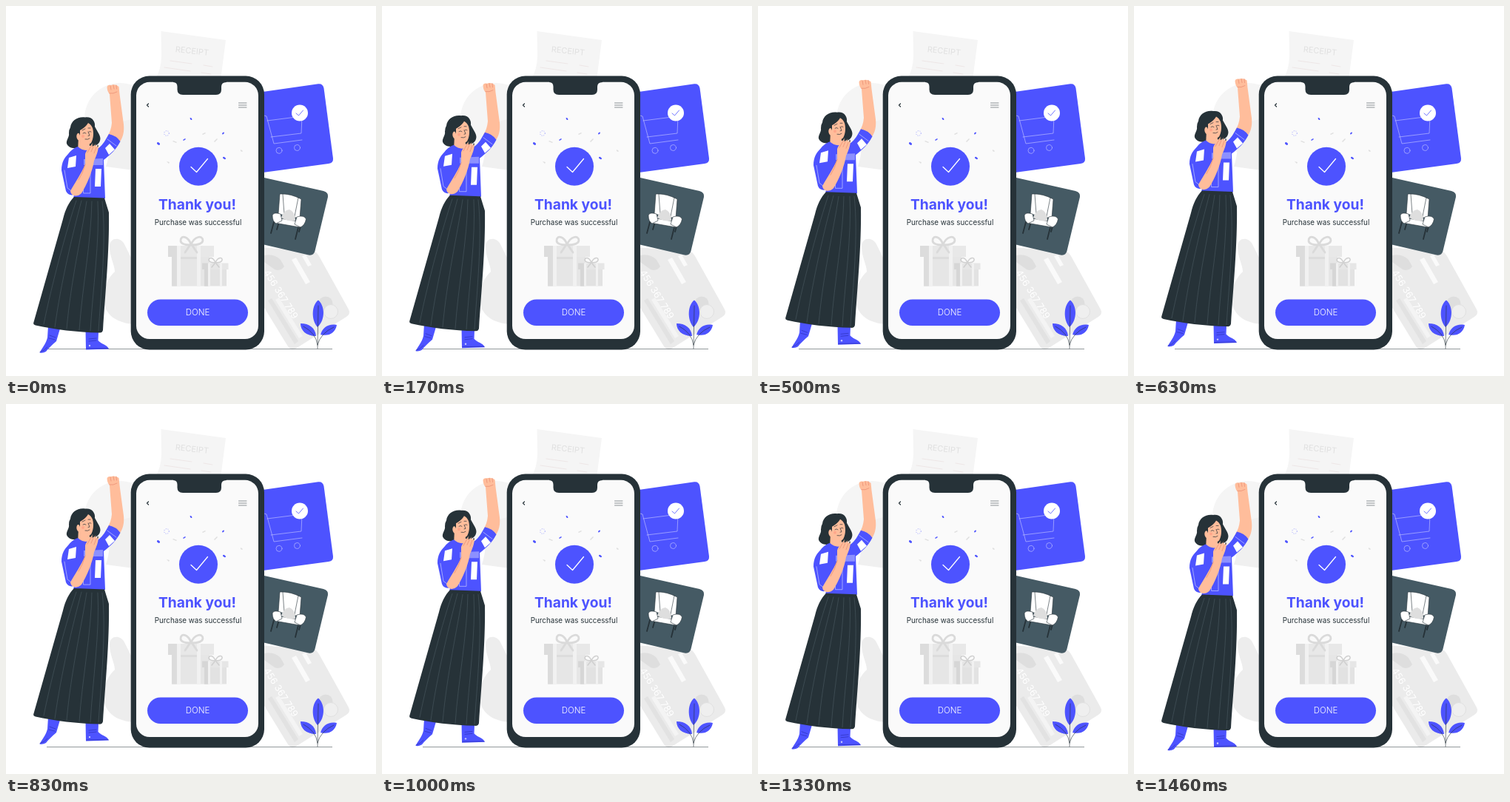
An HTML page that plays this animation: 500x500 px, repeating every 1.5 s.

```html
<!DOCTYPE html>
<html lang="en">
<head>
<meta charset="utf-8">
<style>
html, body { margin: 0; width: 100%; height: 100%; overflow: hidden; background: #fff; }
svg { display: block; width: 100vw; height: 100vh; }
text { font-family: Inter, Lato, sans-serif; text-anchor: middle; }
.blue { fill: #4d53ff; }
.dark { fill: #263238; }
.skin { fill: #ffbd9b; }
.white { fill: #fff; }
.line { fill: none; stroke-linecap: round; stroke-linejoin: round; }
</style>
</head>
<body>
<svg viewBox="0 0 500 500">
  <g id="backdrop">
    <circle cx="154" cy="152" r="48" fill="#f5f5f5"/>
    <path d="M143 160L180 150V223L135 217C140 203 141 182 143 160Z" fill="#f0f0f0"/>
    <path d="M209.500 34L297 46L290 100H201C207 90 210 80 210 65Z" fill="#f5f5f5"/>
    <text transform="translate(251 64.500) rotate(6)" font-size="11" fill="#e0e0e0">RECEIPT</text>
    <path class="line" d="M222 74l29 4m16 2l12 2M214 83l35 5m15 2l13 2" stroke="#ebe2e2" stroke-width=".8"/>
  </g>
  <path d="M175 352L160 322C155 312 140 312 140 325C140 339 147 350 147 359C138 367 132 380 132 396C133 418 150 429 175 430Z" fill="#ededed"/>

  <g id="bank-card">
    <path d="M340 326L416 331Q420 333 423 338L463 410Q466 416 460 420L393 462Q386 467 381 460L340 393Z" fill="#ebebeb"/>
    <path d="M386 343l6-3 19 33-6 3ZM400 338l5-2 8 14-5 2Z" fill="#fafafa"/>
    <path d="M364 397l5-3 32 52-5 3Z" fill="#f4f4f4"/>
    <path d="M354 398l5-3 36 58-5 4Z" fill="#e2e2e2"/>
    <path d="M349 337q13-3 22 6l5 9q-5 7-13 4l-14-10Z" fill="#dedede"/>
    <text transform="translate(368 392) rotate(58)" font-size="12.500" class="white">456 367 789</text>
    <circle cx="432" cy="402" r="9.500" fill="#dedede"/>
    <circle cx="439" cy="413" r="9.500" fill="#efefef" stroke="#e0e0e0"/>
  </g>

  <g id="chair-card">
    <path d="M340 230L429 250Q436 252 435 258L417.500 331Q416 337.500 409 336.500L340 320.500Z" fill="#455a64"/>
    <path class="line" d="M362 292l-4 15m10-12l-2 7m29-3l-4 16m7-17l-2 7" stroke="#263238" stroke-width="1.800"/>
    <g class="white" stroke="#263238" stroke-width=".6" stroke-linejoin="round">
      <path d="M370 254Q384 253 399 261L397 287L368 281Z"/>
      <path d="M374 254L376 281M395 259L390 284" class="line"/>
      <path d="M371 287L394 291L397 299L363 293Z"/>
      <path d="M360 283Q361 278 371 281L373 290L365 294Q360 291 360 283ZM405.500 288Q403 282 393 285L390 295L398 299Q404 296 405.500 288Z"/>
    </g>
    <path d="M372 286Q375 276 383 275Q391 278 391 290Q382 292 372 286Z" fill="#dedede"/>
  </g>

  <g id="cart-card">
    <path class="blue" d="M340 117L422 105.300Q428 104.500 429.500 111L442 206Q442.500 212 436 213L340 226Z"/>
    <g class="line" stroke="#b9bbff" stroke-width=".7">
      <path d="M349 148l3 1 10 37 38-5M353 155l47-6-1 23-41 5"/>
      <circle cx="369" cy="195.300" r="4"/><circle cx="393.500" cy="191.500" r="4"/>
    </g>
    <circle class="white" cx="397" cy="144.500" r="11"/>
    <path class="line" d="M392 145l3.500 3 6-7" stroke="#4d53ff" stroke-width=".8"/>
  </g>

  <path d="M55 463.500H441" stroke="#263238" stroke-width=".5"/>

  <g id="phone">
    <rect class="dark" x="168.700" y="94.500" width="180.300" height="370" rx="25"/>
    <rect fill="#fafafa" x="176" y="102.800" width="165" height="347.200" rx="18"/>
    <path class="dark" d="M226 102H298V103Q291 103 291 109V113Q291 120 284 120H239Q231.500 120 231.500 113V109Q231.500 103 226 103Z"/>
    <path class="line" d="M192.500 132l-2 2 2 2" stroke="#263238" stroke-width="1.200"/>
    <path class="line" d="M314.500 131h10.500m-10.500 3h10.500m-10.500 3h10.500" stroke="#8b9195"/>
    <g class="blue">
      <ellipse cx="206" cy="186" rx="2.300" ry="1.500" transform="rotate(35 206 186)"/>
      <ellipse cx="250" cy="152.500" rx="1.800" ry="1" transform="rotate(50 250 152.500)"/>
      <ellipse cx="293.500" cy="172" rx="1.700" ry="1" transform="rotate(-45 293.500 172)"/>
      <ellipse cx="295" cy="205.500" rx="2.300" ry="1.300" transform="rotate(35 295 205.500)"/>
      <path d="M239 181l3-2 1 1-3 2Z"/>
    </g>
    <circle cx="217" cy="172" r="3.300" fill="none" stroke="#777bff" stroke-dasharray=".8 2" stroke-width=".9"/>
    <path d="M265 173l4-2 1 1-4 2ZM281 183l4-4 1 1-4 4ZM217 210l4 1-1 2ZM226 182l5 2-1 1-5-2ZM317 194l3 2-1 1-2-1Z" fill="#dedede"/>
    <circle class="blue" cx="260" cy="216.700" r="26"/>
    <path class="line" d="M250 217.500l7.500 7 15-18" stroke="#fff" stroke-width="1.300"/>
    <text x="258.500" y="274.500" font-size="19.200" font-weight="650" class="blue">Thank you!</text>
    <text x="259.500" y="295.500" font-size="9.800" class="dark">Purchase was successful</text>
    <rect class="blue" x="191" y="396.500" width="136" height="35.500" rx="17.700"/>
    <text x="259" y="418" font-size="11.500" font-weight="300" class="white">DONE</text>
  </g>

  <g id="gifts">
    <path d="M224 339H275V378.500H224Z" fill="#e6e6e6"/>
    <path d="M219 324H281V339H219Z" fill="#e8e8e8"/>
    <path d="M224 339H231V378.500H224ZM219 324H231V339H219ZM236 339H258V342H236Z" fill="#dcdcdc"/>
    <path d="M231 324H236V378.500H231ZM258 324H263V378.500H258Z" fill="#f1f1f1"/>
    <path class="line" d="M250 322C246 311 236 309 236 317Q236 323 250 323C254 311 266 309 266 317Q265 323 250 323M248 324l-6 9m10-9l6 9" stroke="#dadada" stroke-width="2.800"/>
    <path d="M268 355H298V378.500H268Z" fill="#e2e2e2"/>
    <path d="M265 347.500H300.500V356H265Z" fill="#e6e6e6"/>
    <path d="M268 356H273V378.500H268ZM265 347.500H273V356H265Z" fill="#d6d6d6"/>
    <path d="M273 347.500H276V378.500H273ZM289 347.500H292V378.500H289Z" fill="#f1f1f1"/>
    <path class="line" d="M283 347C280 339 274 339 274 343.500Q275 347 283 347C286 339 293 339 292 343.500Q291 347 283 347M282 348l-4 5m6-5l4 5" stroke="#d0d0d0" stroke-width="1.600"/>
  </g>

  <g id="plant">
    <path class="blue" d="M421 434C412 424 413 404 422 397.500C431 405 432 424 421 434ZM419 446C405 446 398 438 398 429C410 429 418 435 419 446ZM425 444C428 434 436 429 447 431C445 442 436 447 425 444Z"/>
    <path class="line" d="M422 405L421 463M402 433Q419 442 421 458M443 434Q425 442 421 458" stroke="#263238" stroke-width=".6"/>
  </g>

  <g id="woman">
    <path class="blue" d="M57 432L73 436L68 453C62 458 57 463 54 467Q50 469.500 45.500 468.500C48 463 54 457 56 448ZM107.500 437L125 440L124.500 452C129 457 137 458 139 463.500L108 464.500Z"/>
    <path class="line" d="M46 467.500Q52 466 56 461M109 463L138 462.500M59 445l8 3m-9 1l8 2M112 450l10-1m-10 4l10-1" stroke="#2d31b8" stroke-width=".7"/>
    <circle cx="113" cy="459" r="1.200" fill="#c9caff"/>
    <path class="skin" d="M136.500 110Q137 106 142 107Q148 105 152.500 109L153.500 119L159 160C160 170 158 178 153 185L137 176Q142 169 143 158L140 119Q137 116 136.500 110Z"/>
    <path class="line" d="M141 108l1 5m3-6l1 5m3-5l.500 5M140 118Q145 119 150 116" stroke="#e98a70" stroke-width=".7"/>
    <path class="dark" d="M87 164C88 155 97 149 107 150.500C116 149 121 156 120 163C124 171 129 176 127 182C125 189 116 191 110 188L99 191C91 194 84 191 82 186C81 181 86 177 85 172Q85 167 87 164Z"/>
    <path class="skin" d="M98 176L97 198Q108 206 114 196L112 181Z"/>
    <path class="skin" d="M100 168C106 165 109 161 111 158Q115 160 117 165C119 172 118 180 115 185C109 190 103 187 100 182C95 182 94 174 97 172Q99 171 100 175Z"/>
    <path class="line" d="M104 172q2-2 4 0m4-2q2-1 3 0M103 168l4-2m4-1l3 0M111 170l2 5-2 .500M107 180q4 1 6-1" stroke="#263238" stroke-width=".7"/>
    <circle cx="104" cy="176" r="2" fill="#ff927c" opacity=".5"/>
    <path class="blue" d="M97 190Q106 198 115 193L125 192C131 188 135 180 139 173Q149 175 154.500 183C149 194 140 202 132 208L134 260H91L92 255Q84 257 81 250L75 222C75 211 79 205 84 200Q89 193 97 190Z"/>
    <path class="white" d="M85 205L95 202L94 217L83 219ZM121 220H129L128 244H120ZM134 192L140 186L147 194L139 201Z"/>
    <path d="M105 207L131 206L131 215H105Z" fill="#8c90ff"/>
    <path class="line" d="M104 222H114V253H105ZM79 222l4 24 8 6M137 180l12 9" stroke="#c5c7ff" stroke-width=".7"/>
    <path class="skin" d="M87 250C93 239 102 226 107 214L107 200C109 194 114 190 117 185L118 190L121 186L122 190L125 188C125 195 122 203 119 209C117 223 109 242 102 253C96 259 88 257 87 250Z"/>
    <path class="line" d="M115 197l3-7m1 9l3-8M110 198l5-9M107 214Q104 226 98 235" stroke="#e98a70" stroke-width=".7"/>
    <path class="line" d="M117 186v3m4-3v2m3 0v2" stroke="#263238" stroke-width="1.100"/>
    <path class="dark" d="M92 258L133 259.500L139 279C140 330 134 390 131 438Q130 442 126 441.500C97 441 65 437 40 431.500Q36 430.500 37.500 427L77 288C80 275 85 265 92 258Z"/>
    <path class="line" d="M95 263C83 298 62 375 51 430M102 263C90 308 74 375 66 434M109 264C101 315 88 370 82 436M116 264C115 320 103 380 99 438M124 264C127 315 117 385 114 439M130 264C136 315 128 390 125 439" stroke="#53636b" stroke-width=".5"/>
  </g>
</svg>
<script>
const LOOP = 1500, LIFT = 10;
const woman = document.getElementById('woman');

function draw(now) {
  const phase = now % LOOP / LOOP;
  const rise = LIFT * (1 - Math.abs(1 - 2 * phase));
  woman.setAttribute('transform', `translate(0 ${-rise})`);
  requestAnimationFrame(draw);
}
requestAnimationFrame(draw);
</script>
</body>
</html>
```
